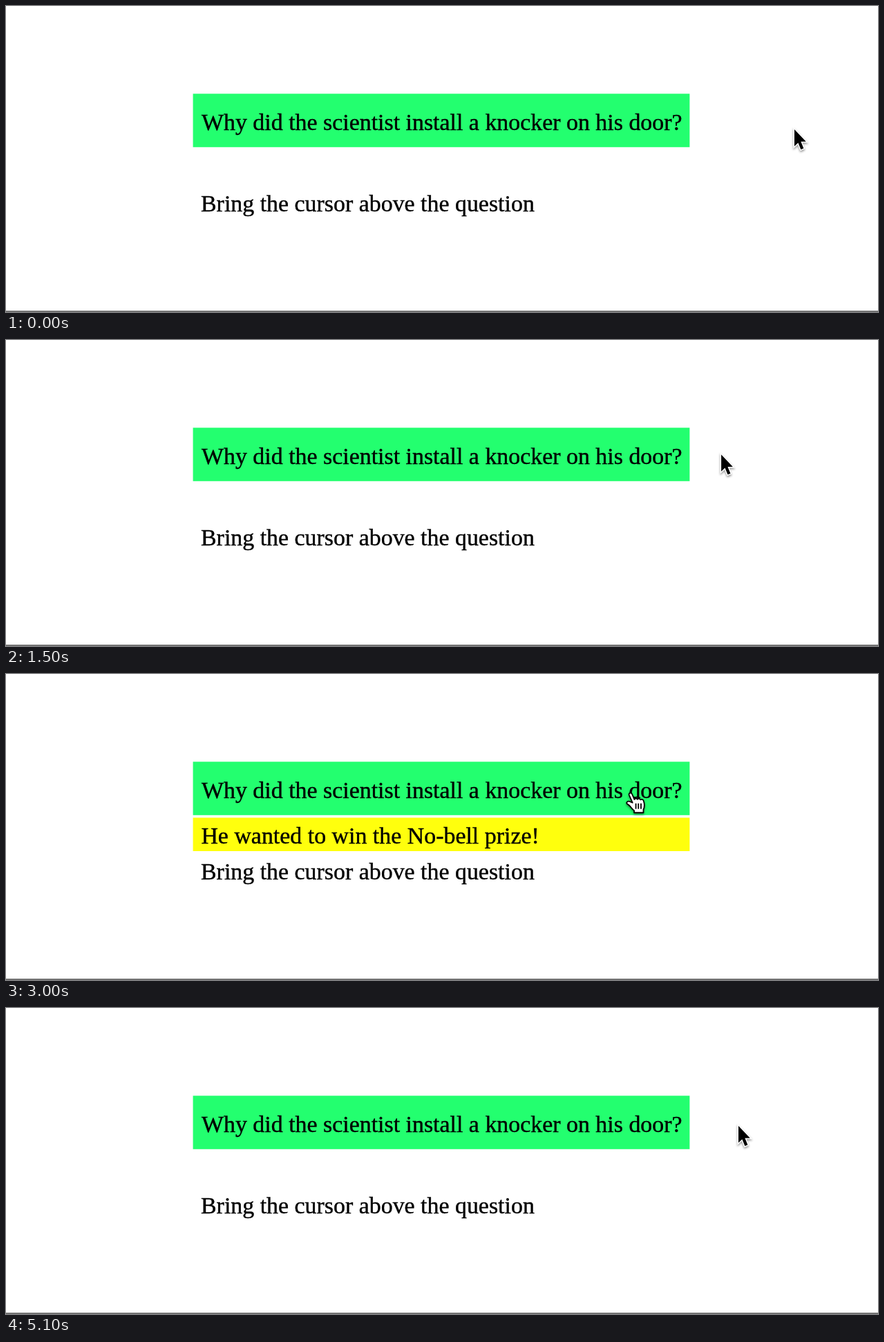
An HTML page for the animation above (5.2 s loop, 1262 px wide and 444 px high).

```html
<!DOCTYPE html>
<html lang="en">
<head>
<meta charset="utf-8">
<title>Hover for the answer</title>
<style>
  html, body { margin: 0; width: 100%; height: 100%; overflow: hidden; background: #fff; }
  svg { display: block; width: 1262px; height: 444px; }
  text { font: 33.9px "Liberation Serif", serif; fill: #000; stroke: #000; stroke-width: .4; }
  #arrow, #hand { filter: drop-shadow(0 2px 1.5px rgba(0, 0, 0, .4)); }
</style>
</head>
<body>
<svg viewBox="0 0 1262 444">
  <rect x="270.6" y="127.3" width="718.8" height="77.5" fill="#23ff6f"/>
  <text x="283" y="180">Why did the scientist install a knocker on his door?</text>
  <g id="answer">
    <rect x="270.6" y="208.5" width="718.8" height="48.5" fill="#ffff0d"/>
    <text x="282.4" y="246">He wanted to win the No-bell prize!</text>
  </g>
  <text x="282" y="298">Bring the cursor above the question</text>
  <rect y="442" width="1262" height="2" fill="#747474"/>
  <g id="cursor">
    <path id="arrow" d="M1 0V24.5L6.4 19.4L10.4 29.2L14.4 27.5L10.4 17.8H17.8Z"
      stroke="#fff" stroke-width="3" paint-order="stroke"/>
    <g id="hand" transform="translate(-6 -1)" stroke="#000" stroke-width="1.8" stroke-linejoin="round">
      <path fill="#fff" d="M9.5 15.5L4.6 4.5C3.4 1 7.6 .2 8.8 3L12.2 10.8C13 8.8 15.8 8.8 16.6 10.6
        C17.7 9 20.2 9.2 20.8 11.2C22.6 10 25.2 10.8 25.6 13.2C26.8 17 27.4 21 25.2 25.5V30H11.8V27
        C8 24 5.4 19 1.8 17.4C-.4 15.2 2.6 12.6 5 13.6C7 14.2 8 15 9.5 15.5Z"/>
      <path d="M14.3 16.5V24.5M18 16.5V24.5M21.7 16.5V24.5"/>
    </g>
  </g>
</svg>
<script>
  const LOOP = 5200, STEP = 100, BOX_RIGHT = 989.5;
  // turning points of the pointer tip: time, x, y
  const stops = [
    [0, 1140, 179], [820, 933, 178], [1290, 933, 161], [1800, 1207, 175],
    [2366, 1186, 175], [2900, 900, 172], [3720, 980, 178], [4200, 1059, 171], [LOOP, 1059, 171]
  ];
  const el = id => document.getElementById(id);
  const show = (id, on) => el(id).style.display = on ? '' : 'none';
  const ease = k => k * k * (3 - 2 * k);

  function tipAt(t) {
    const i = stops.findIndex(s => s[0] > t);
    const [t0, x0, y0] = stops[i - 1], [t1, x1, y1] = stops[i];
    const k = ease((t - t0) / (t1 - t0));
    return [x0 + (x1 - x0) * k, y0 + (y1 - y0) * k];
  }

  function draw(now) {
    const [x, y] = tipAt(Math.floor(now % LOOP / STEP) * STEP);
    const over = x < BOX_RIGHT;
    el('cursor').setAttribute('transform', `translate(${x} ${y})`);
    show('answer', over);
    show('hand', over);
    show('arrow', !over);
  }

  const start = performance.now();
  function tick() {
    draw(performance.now() - start);
    requestAnimationFrame(tick);
  }
  tick();
</script>
</body>
</html>
```
